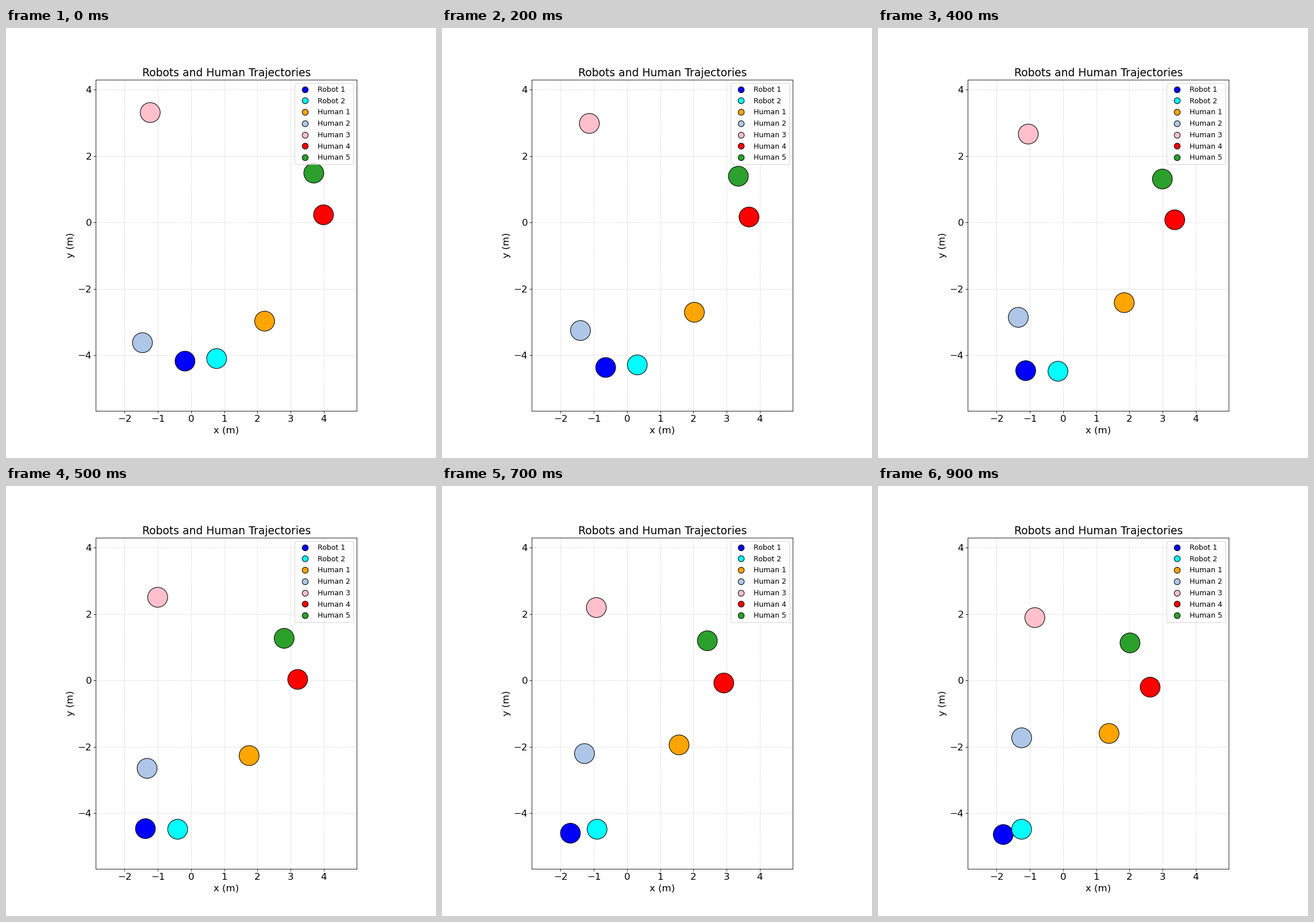
Write a matplotlib script that moves like this. It is 748 px wide and 748 px high and loops after 1000 ms.

```python
import numpy as np
import matplotlib.pyplot as plt
from matplotlib.animation import FuncAnimation
from matplotlib.lines import Line2D
from matplotlib.patches import Circle

SIZE, DPI = 748, 74.8
FRAMES, INTERVAL = 10, 100
RADIUS = 0.3
CRUISE = 0.25  # robot step length in metres
WEST, WEST_SOUTHWEST = np.radians([180, 202.5])


def drive(start, *legs):
    """Path of straight legs, each given as (steps, step length, heading)."""
    def position(step):
        x, y = start
        for count, length, heading in legs:
            travelled = length * np.clip(step, 0, count)
            x += travelled * np.cos(heading)
            y += travelled * np.sin(heading)
            step -= count
        return x, y
    return position


def stroll(start, middle, end):
    """Smooth parabolic path through three points over the whole loop."""
    a, b, c = map(np.array, (start, middle, end))

    def position(step):
        t = step / (FRAMES - 1)
        return a * (1 - t) * (1 - 2 * t) + b * 4 * t * (1 - t) + c * t * (2 * t - 1)
    return position


AGENTS = [
    ("Robot 1", "blue", drive((-0.182, -4.181),
                              (3, CRUISE, WEST_SOUTHWEST), (2, CRUISE, WEST),
                              (3, 0.179, WEST_SOUTHWEST),
                              (1, -0.075, WEST_SOUTHWEST))),
    ("Robot 2", "cyan", drive((0.771, -4.103),
                              (4, CRUISE, WEST_SOUTHWEST), (3, CRUISE, WEST),
                              (2, 0.173, WEST))),
    ("Human 1", "orange", stroll((2.218, -2.976), (1.797, -2.343), (1.386, -1.599))),
    ("Human 2", "#aec7e8", stroll((-1.464, -3.625), (-1.336, -2.757), (-1.247, -1.730))),
    ("Human 3", "pink", stroll((-1.230, 3.310), (-1.026, 2.583), (-0.849, 1.892))),
    ("Human 4", "red", stroll((3.993, 0.229), (3.290, 0.055), (2.625, -0.204))),
    ("Human 5", "#2ca02c", stroll((3.699, 1.485), (2.901, 1.287), (2.018, 1.130))),
]

plt.rcParams["font.family"] = "DejaVu Sans"
fig, ax = plt.subplots(figsize=(SIZE / DPI, SIZE / DPI), dpi=DPI)
fig.subplots_adjust(left=0.125, right=0.9, bottom=0.11, top=0.88)
ax.set_aspect("equal")
ax.set_xlim(-2.87, 5.0)
ax.set_ylim(-5.675, 4.303)
ax.set_xticks(range(-2, 5))
ax.set_yticks(range(-4, 5, 2))
ax.tick_params(labelsize=16)
ax.set_xlabel("x (m)", fontsize=16)
ax.set_ylabel("y (m)", fontsize=16)
ax.set_title("Robots and Human Trajectories", fontsize=18)
ax.grid(True, linestyle="--", alpha=0.5)

discs, handles = [], []
for name, color, _ in AGENTS:
    disc = Circle((0, 0), RADIUS, facecolor=color, edgecolor="black", zorder=2)
    discs.append(ax.add_patch(disc))
    handles.append(Line2D([], [], marker="o", linestyle="none", markersize=10,
                          markerfacecolor=color, markeredgecolor="black",
                          label=name))
ax.legend(handles=handles, loc="upper right", fontsize=12, labelspacing=0.54)


def update(step):
    for disc, (_, _, position) in zip(discs, AGENTS):
        disc.center = position(step)
    return discs


anim = FuncAnimation(fig, update, frames=FRAMES, interval=INTERVAL,
                     repeat=True, repeat_delay=0)
plt.show()
```
